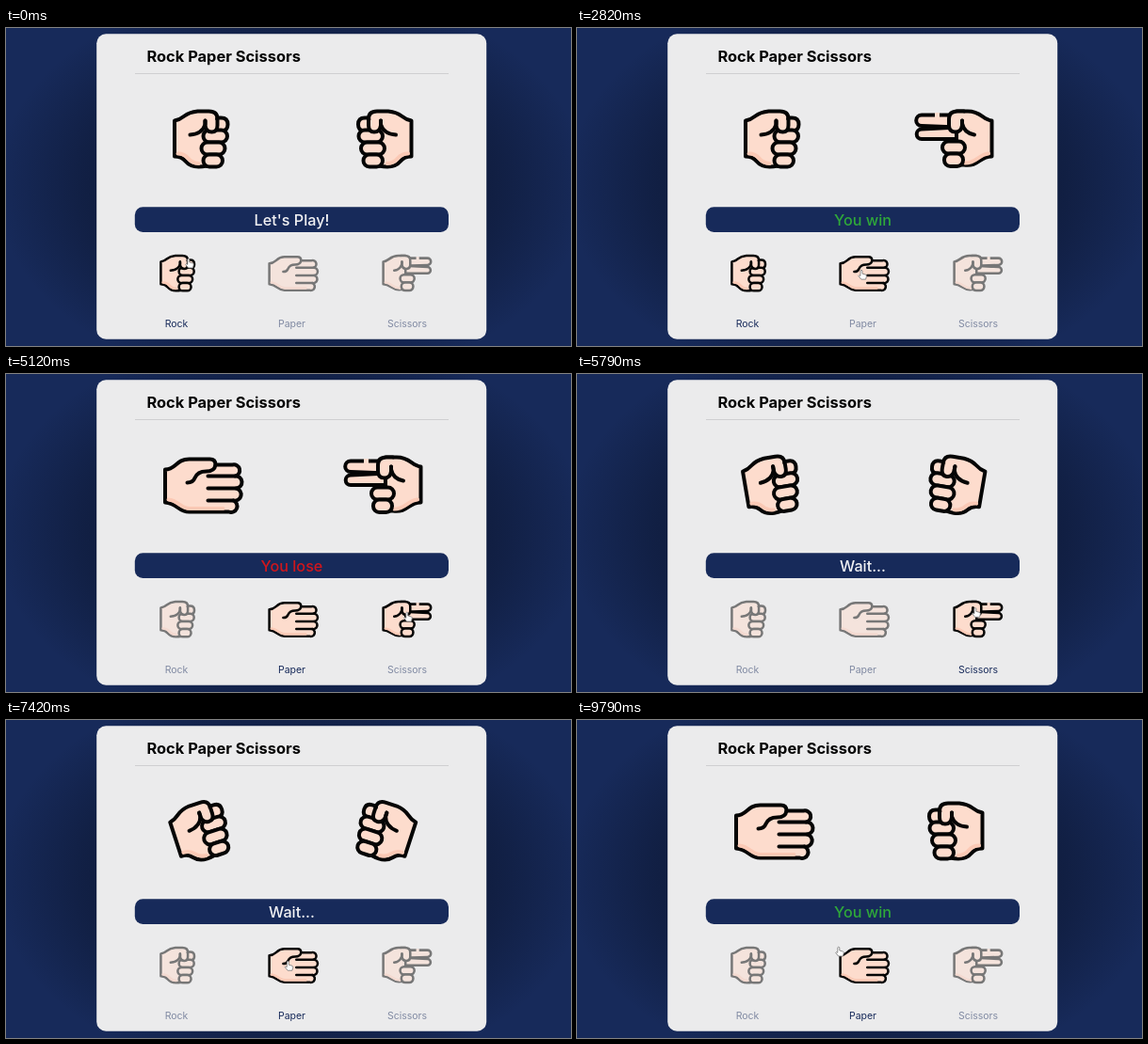
Recreate the animation shown at these times as an HTML page. Size 600 by 338 pixels, loop 9850 ms.

```html
<!DOCTYPE html>
<html lang="en">
<head>
<meta charset="utf-8">
<title>Rock Paper Scissors</title>
<style>
  html, body { margin: 0; width: 100%; height: 100%; overflow: hidden; background: #172a5a; }
  svg { display: block; width: 100vw; height: 100vh; font-family: Inter, "Open Sans", sans-serif; }
  .hand { fill: #fddccd; stroke: #050505; stroke-width: 4; stroke-linecap: round; stroke-linejoin: round; }
  .line { fill: none; }
  .shade { fill: none; stroke: #fbc9b5; stroke-width: 4; }
  .label { font-size: 10.5px; fill: #172a5a; text-anchor: middle; }
</style>
</head>
<body>
<svg viewBox="0 0 600 338">
  <defs>
    <radialGradient id="glow">
      <stop offset=".5" stop-color="#0b142c" stop-opacity=".75"/>
      <stop offset=".72" stop-color="#0b142c" stop-opacity=".45"/>
      <stop offset="1" stop-color="#0b142c" stop-opacity="0"/>
    </radialGradient>
    <g id="rock" class="hand">
      <path d="M-29.5 -20Q-24 -21 -19 -25T-5 -30H7Q16 -30 16 -22V25Q4 29 -4 29Q-13 29 -18 23Q-22 18 -29.5 18Z"/>
      <path class="shade" d="M-26 15Q-19 15 -15 20T-4 25.5"/>
      <path d="M16 -23H20Q27 -23 27 -16Q27 -9 20 -9H13Z"/>
      <rect x="1" y="-10" width="25.5" height="13" rx="6.5"/>
      <rect x="-1" y="3" width="25" height="13" rx="6.5"/>
      <rect x="1" y="16" width="20.5" height="13" rx="6.5"/>
      <path d="M3 -20V-15Q4 -8 10 -8Q16 -8 16 -15V-21" />
      <path class="line" d="M3 -20V-16Q0 -6 -13 -5"/>
    </g>
    <g id="paper" class="hand">
      <path d="M-39.5 -17C-28 -17 -28 -28 -14 -28H8Q14 -28 14 -22H32a6 6 0 0 1 3 12a6.5 6.5 0 0 1 1 13a6.5 6.5 0 0 1 -3 13a6 6 0 0 1 -5 12H-14C-26 28 -26 19 -39.5 18Z"/>
      <path class="shade" d="M-36 15C-25 16 -24 24.5 -13 24.5H22"/>
      <path class="line" d="M14 -22Q13 -15 4 -15Q-5 -15 -8 -8Q-10 -3 -16 -3M6 -10H35M6 3H36M6 16H33"/>
    </g>
    <g id="scissors" class="hand">
      <path d="M-4 -26H35a5.8 5.8 0 0 1 0 11.6L-4 -13Z"/>
      <path d="M-4 -13L35 -11a5.3 5.3 0 0 1 0 10.6H-4Z"/>
      <path style="stroke:#fddccd;stroke-linecap:butt;stroke-width:5" d="M16 -26h5"/>
      <path d="M-39.5 -20C-30 -21 -28 -30 -14 -30H-2V27H-10C-26 29 -26 18 -39.5 18Z"/>
      <path class="shade" d="M-36 15C-25 16 -24 25 -11 25"/>
      <rect x="-11" y="2" width="24" height="13" rx="6.5"/>
      <rect x="-9" y="15" width="20" height="13.5" rx="6.5"/>
      <path style="stroke:none" d="M-8 -28H0V-10H-8Z"/>
      <path d="M-8 -20V-15Q-7 -8 -1 -8Q6 -8 6 -15V-22Q6 -30 -3 -30H-10"/>
      <path class="line" d="M-8 -20V-17Q-10 -7 -21 -5"/>
    </g>
  </defs>

  <rect width="600" height="338" fill="#172a5a"/>
  <ellipse cx="303" cy="168" rx="315" ry="215" fill="url(#glow)"/>
  <rect x="96.2" y="6.2" width="414" height="324.6" rx="10" fill="#ebebec"/>
  <text x="149.5" y="36" font-size="16.4" font-weight="700" fill="#050505">Rock Paper Scissors</text>
  <path d="M137 48.5H470" stroke="#cfcfd1"/>
  <use id="user"/>
  <use id="bot"/>
  <rect x="136.8" y="190.2" width="333.2" height="26.8" rx="8.5" fill="#172a5a"/>
  <text id="result" x="303.5" y="209.5" font-size="16.2" font-weight="500" text-anchor="middle"></text>
  <g id="options"></g>
  <g id="cursor" fill="#fff" stroke="#777" stroke-width=".8" stroke-linejoin="round">
    <path id="arrow" d="M0 0V7L1.7 5.6L2.8 8L3.7 7.6L2.7 5.2H4.7Z"/>
    <path id="pointer" d="M-.2 5.5V.8Q.8 -.6 1.8 .8V4L5.5 5Q6.5 5.4 6.2 7L5.4 10H.6L-2.3 6.4Q-2 5 -.2 6.3Z"/>
  </g>
</svg>
<script>
const LOOP = 9850, WAIT = 1400, SHAKE = 600, SWING = 20;
const $ = id => document.getElementById(id);
const WHITE = '#f2f2f4', GREEN = '#2fa83a', RED = '#d0161c';

const options = [['rock', 'Rock', 183, 181], ['paper', 'Paper', 304.5, 303.5], ['scissors', 'Scissors', 425.5, 426]];
$('options').innerHTML = options.map(([id, name, x, labelX]) =>
  `<use href="#${id}" transform="translate(${x} 261) scale(.63)"/><text class="label" x="${labelX}" y="318">${name}</text>`).join('');

const rounds = [
  { at: 800, pick: 'rock', bot: 'scissors', text: 'You win', color: GREEN },
  { at: 3430, pick: 'paper', bot: 'scissors', text: 'You lose', color: RED },
  { at: 5539, pick: 'scissors', bot: 'paper', text: 'You win', color: GREEN },
  { at: 7229, pick: 'paper', bot: 'rock', text: 'You win', color: GREEN }
];

// Cursor tip: time, x, y
const path = [
  [0, 193, 245], [800, 193, 246], [1250, 225, 240], [2300, 225, 240], [2900, 305, 258], [3450, 305, 258],
  [3750, 193, 226], [4100, 193, 226], [4800, 425, 253], [5700, 425, 253], [6100, 403, 218], [6550, 403, 218],
  [7050, 300, 258], [7350, 300, 258], [7800, 278, 232], [9200, 278, 232], [9500, 277, 241], [LOOP, 277, 241]
];

function cursorAt(t) {
  const i = path.findIndex(p => p[0] > t);
  const [t0, x0, y0] = path[i - 1], [t1, x1, y1] = path[i];
  const u = (t - t0) / (t1 - t0), k = u * u * (3 - 2 * u);
  return [x0 + (x1 - x0) * k, y0 + (y1 - y0) * k];
}

function setHand(id, shape, x, flip, angle) {
  $(id).setAttribute('href', '#' + shape);
  $(id).setAttribute('transform', `translate(${x} 118.5) scale(${flip} 1) rotate(${angle})`);
}

function draw(now) {
  const t = now % LOOP;
  const round = rounds.filter(r => r.at <= t).pop();
  const since = round ? t - round.at : 0;
  const waiting = round && since < WAIT;
  const done = round && !waiting;
  const angle = waiting ? -SWING * Math.sin(since / SHAKE * 2 * Math.PI) : 0;

  setHand('user', done ? round.pick : 'rock', 208.5, 1, angle);
  setHand('bot', done ? round.bot : 'rock', 401, -1, angle);
  $('result').textContent = done ? round.text : waiting ? 'Wait...' : "Let's Play!";
  $('result').setAttribute('fill', done ? round.color : WHITE);

  const [x, y] = cursorAt(t);
  const picked = round ? round.pick : 'rock';
  let hovering = false;
  options.forEach(([id, , cx], i) => {
    const hover = Math.abs(x - cx) < 30 && y > 237;
    hovering = hovering || hover;
    const [icon, label] = [...$('options').children].slice(i * 2);
    icon.setAttribute('opacity', hover || id === picked ? 1 : .5);
    label.setAttribute('opacity', id === picked ? 1 : .5);
  });
  $('cursor').setAttribute('transform', `translate(${x} ${y})`);
  $('arrow').setAttribute('opacity', hovering ? 0 : 1);
  $('pointer').setAttribute('opacity', hovering ? 1 : 0);
}

const start = performance.now();
function tick() {
  draw(performance.now() - start);
  requestAnimationFrame(tick);
}
tick();
</script>
</body>
</html>
```
